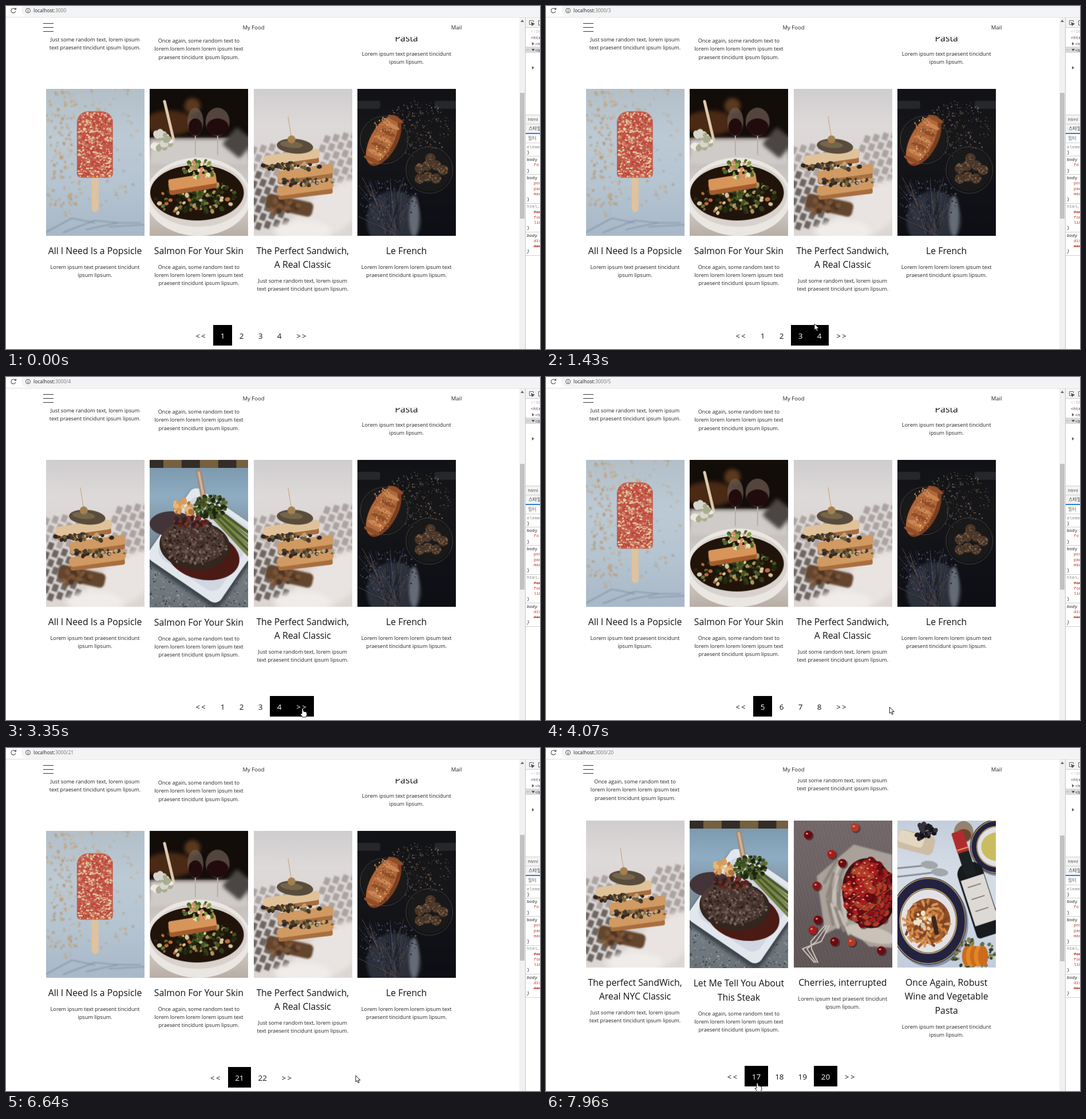
Recreate the animation shown at these times as an HTML page with a canvas. Size 933 by 600 pixels, loop 8 s.

```html
<!DOCTYPE html>
<html lang="en">
<head>
<meta charset="utf-8">
<title>My Food</title>
<style>
html, body { margin: 0; width: 100%; height: 100%; overflow: hidden; background: #fff; }
canvas { display: block; }
</style>
</head>
<body>
<canvas id="stage" width="933" height="600"></canvas>
<script>
const LOOP = 8000, LAST_PAGE = 22;
const SANS = '"Open Sans", "Noto Sans", sans-serif', MONO = '"Liberation Mono", monospace';
const KOREAN = '"Noto Sans CJK KR", "Noto Sans CJK", sans-serif';
const screen = document.getElementById('stage').getContext('2d');
let g = screen, seed = 1;

// Drawing helpers, all working on the current context g
const random = (from = 0, to = 1) => from + (to - from) * (seed = seed * 16807 % 2147483647) / 2147483647;
const pick = list => list[Math.floor(random(0, list.length))];
const repeat = (n, draw) => { for (let i = 0; i < n; i++) draw(i); };
const rect = (x, y, w, h, c) => { g.fillStyle = c; g.fillRect(x, y, w, h); };
const oval = (x, y, rx, ry = rx, c, rot = 0) => {
  g.fillStyle = c; g.beginPath(); g.ellipse(x, y, rx, ry, rot, 0, 7); g.fill();
};
const ring = (x, y, rx, ry, c, w = 1) => {
  g.strokeStyle = c; g.lineWidth = w; g.beginPath(); g.ellipse(x, y, rx, ry, 0, 0, 7); g.stroke();
};
const slab = (x, y, w, h, c, rot = 0, r = 4) => {
  g.save(); g.translate(x, y); g.rotate(rot);
  g.fillStyle = c; g.beginPath(); g.roundRect(-w / 2, -h / 2, w, h, r); g.fill();
  g.restore();
};
const trace = p => { g.beginPath(); for (let i = 0; i < p.length; i += 2) g.lineTo(p[i], p[i + 1]); };
const shape = (c, ...p) => { trace(p); g.fillStyle = c; g.fill(); };
const line = (c, w, ...p) => { trace(p); g.strokeStyle = c; g.lineWidth = w; g.stroke(); };
const wash = (...colors) => {
  const fill = g.createLinearGradient(0, 0, 0, 259);
  colors.forEach((c, i) => fill.addColorStop(i / (colors.length - 1), c));
  rect(0, 0, 172, 259, fill);
};
// Random specks inside an ellipse
const dots = (n, x, y, rx, ry, size, ...colors) => repeat(n, () => {
  const a = random(0, 6.283), d = Math.sqrt(random()), s = size * random(.5, 1.2);
  oval(x + Math.cos(a) * d * rx, y + Math.sin(a) * d * ry, s, s * .8, pick(colors), a);
});
// Evenly packed points inside an ellipse, from the rim inwards
const heap = (n, x, y, rx, ry, draw) => repeat(n, i => {
  const a = i * 2.4, d = Math.sqrt(1 - i / n);
  draw(x + Math.cos(a) * d * rx, y + Math.sin(a) * d * ry, a);
});
const soft = (px, draw) => { g.filter = `blur(${px}px)`; draw(); g.filter = 'none'; };
const text = (s, x, y, size, c = '#111', align = 'left', family = SANS, style = '') => {
  g.font = `${style} ${size}px ${family}`; g.fillStyle = c; g.textAlign = align;
  g.fillText(s, x, y);
};

// Simplified food pictures, each 172 by 259
const paint = {
  popsicle() {
    wash('#b3c0ca', '#bccad5', '#b5c4d1', '#a8b8c8');
    soft(1, () => {
      repeat(4, i => line('#8191a3', 1.6, i * 40 - 10, 258 - i * 5, i * 40 + 45, 228 + i * 4, i * 40 + 85, 236));
      dots(100, 30, 70, 32, 75, 2.4, '#c4a680', '#b79a79', '#d0b693');
      dots(110, 100, 90, 70, 120, 2.2, '#c4a680', '#d0b693', '#b0a294');
      dots(50, 32, 180, 30, 45, 2.4, '#c4a680', '#b79a79');
    });
    slab(86, 180, 12, 74, '#dfc39e', 0, 6);
    slab(85.5, 98, 63, 117, '#c4594a', 0, [20, 20, 7, 7]);
    g.save(); g.clip();
    g.beginPath(); g.roundRect(54, 40, 63, 117, [20, 20, 7, 7]); g.clip();
    g.restore();
    repeat(560, () => {
      const y = random(42, 155), inset = Math.max(0, 52 - y);
      oval(random(56 + inset, 115 - inset), y, random(1.2, 2.6), 1.6, pick(['#dcb98f', '#e6cfac', '#c23e38', '#cf8a6c', '#b5483a']));
    });
  },
  salmon() {
    wash('#0e0a08', '#1d120c', '#c4bfbc', '#d8d3cf', '#b8aea5');
    rect(0, 0, 172, 86, '#130d0a');
    soft(3, () => {
      oval(35, 60, 45, 22, '#4a2a14'); oval(75, 30, 14, 14, '#5b391d');
      rect(0, 88, 172, 45, '#cfcbc9'); slab(155, 95, 40, 40, '#4b4644', .7);
    });
    line('#dccab0', 5, 26, 22, 42, 90);
    dots(18, 20, 94, 18, 16, 7, '#efe9e2', '#d8d6cc', '#a9ae91');
    for (const [x, r] of [[80, 14], [119, 21]]) {
      line('#b9afa8', 2, x, 80, x, 116);
      oval(x, 58, r, 25, '#6b5a51bb'); oval(x, 67, r - 2, 15, '#220b0d');
    }
    oval(85, 190, 92, 69, '#eae6e2'); oval(85, 186, 86, 57, '#d9d2cc'); oval(83, 183, 82, 49, '#20130a');
    dots(90, 92, 190, 60, 28, 4.5, '#2f3d18', '#45551f', '#1e2911', '#a89a60');
    dots(40, 75, 198, 72, 24, 4, '#d4c69b', '#66763a', '#bb6c37', '#2c250f');
    slab(75, 170, 84, 22, '#a45b2c', -.16); slab(75, 163, 84, 20, '#d8955a', -.16);
    dots(60, 86, 141, 30, 15, 4, '#e8e1bd', '#879b4b', '#4f682a', '#da8d64');
  },
  sandwich() {
    wash('#d0cdce', '#dedada', '#dcd6d4', '#d8d2ce', '#ddd8d5');
    soft(1, () => repeat(120, i => {
      const x = i % 12 * 16 + Math.floor(i / 12) % 2 * 8, y = 108 + Math.floor(i / 12) * 15 - x * .15;
      if (x < 60 || x > 115) slab(x, y, 10, 13, x < 60 && y > 150 ? '#6d6664' : '#aaa3a2', .35, 1);
    }));
    soft(5, () => { oval(135, 215, 85, 38, '#e9e4e1', -.6); oval(85, 250, 50, 18, '#f0ecea'); });
    soft(1.5, () => { slab(62, 205, 84, 26, '#64462f', .22, 8); dots(25, 50, 208, 30, 12, 5, '#7d5637', '#4d3424'); });
    repeat(3, i => {
      const x = 78 + (i < 2) * 12 - (i > 1) * 12, y = 174 - i * 27;
      slab(x, y + 7, 96, 18, '#a86e3e', -.12); slab(x, y, 100, 17, i < 2 ? '#d09a62' : '#e0c29a', -.14, 7);
      if (i) dots(45, x, y + 17, 52, 6, 4, '#46392b', '#71643a', '#2f2721', '#c5a178');
    });
    oval(72, 101, 32, 13, '#5a4c3c', .08); oval(66, 98, 20, 6, '#75654a', .1);
    line('#c9a67c', 1.2, 60, 49, 66, 87); oval(66, 89, 7, 7, '#a4804f');
  },
  french() {
    wash('#111216', '#17171a', '#111217', '#0d0f14');
    for (const x of [15, 160]) slab(x, 28, 50, 14, '#26272b');
    dots(260, 105, 70, 58, 50, 1, '#8a755c', '#615143', '#a98e6d');
    for (const [x, y, r] of [[47, 90, 42], [126, 143, 41]]) { ring(x, y, r, r, '#45413e'); oval(x, y, r - 3, r - 3, '#1a191a'); }
    oval(46, 91, 49, 24, '#7c3f20', -1.08); oval(43, 90, 46, 20, '#b0683a', -1.08);
    repeat(7, i => oval(25 + i * 7, 125 - i * 12, 15, 4, i % 2 ? '#c98553' : '#8f4e2a', .45));
    dots(120, 44, 88, 20, 38, 1.3, '#e0b07c', '#8b4d29', '#c27a45');
    heap(8, 126, 143, 24, 24, (x, y) => { oval(x, y, 9, 9, '#4d3a2c'); dots(22, x, y, 8, 8, 1.4, '#8b6d50', '#3d2c22'); });
    soft(2, () => { oval(64, 232, 48, 52, '#2b303a'); oval(99, 224, 9, 36, '#666c77'); });
    repeat(80, () => line(pick(['#423d43', '#2a3042', '#171b24', '#5a4f48']), .9, random(0, 95), random(155, 225), random(50, 75), 258));
    dots(120, 55, 198, 50, 42, 1.6, '#444f7c', '#353b60', '#5d5068', '#1c2030');
  },
  steak() {
    wash('#7895aa', '#8fadc2', '#7c909c', '#767e85', '#6b7379');
    repeat(6, i => rect(i * 32 - 8, 0, 32, 14, i % 2 ? '#75603f' : '#342d27'));
    dots(600, 86, 215, 120, 70, 1.4, '#465058', '#a2aaae', '#8a959b', '#30373d');
    soft(3, () => slab(98, 157, 156, 156, '#3d434a', .6, 14));
    slab(98, 150, 152, 152, '#e2e7ee', .6, 14); slab(98, 147, 130, 130, '#d0d7e2', .6, 20);
    oval(94, 168, 64, 42, '#4c1a14', .2); oval(38, 112, 38, 22, '#43343a');
    dots(24, 60, 84, 17, 14, 6, '#d99b59', '#b3733c', '#e7b877');
    line('#a78a72', 10, 86, 22, 97, 78); line('#cdb49e', 4, 86, 22, 96, 72);
    repeat(6, i => line(i % 2 ? '#7a8548' : '#4b5a2a', 5, 112, 82 + i * 4, 174, 128 + i * 8));
    dots(120, 106, 82, 28, 22, 4, '#263517', '#425424', '#5d6d35', '#1c2412');
    oval(79, 150, 62, 43, '#33261f', .1); oval(76, 144, 56, 37, '#503c36', .1);
    dots(320, 78, 148, 57, 38, 2.6, '#6d5850', '#372923', '#7d6962', '#46332c', '#2b1f1b');
    dots(50, 74, 108, 36, 9, 4, '#5c211b', '#35201c', '#793428');
  },
  cherries() {
    wash('#74686b', '#6f6466', '#655a5c', '#615658');
    repeat(85, i => line(i % 2 ? '#ffffff08' : '#00000010', 1, i * 3 - 70, 0, i * 3, 259));
    const cherry = (x, y) => {
      oval(x + 2, y + 2, 8, 8, '#2a101580'); oval(x, y, 7.5, 7.5, pick(['#8d1116', '#a61d1b', '#6d0a0f', '#b53a26']));
      oval(x - 2, y - 2, 2, 1.4, '#dba095');
    };
    soft(1, () => {
      shape('#aaa29a', 40, 98, 105, 42, 172, 60, 172, 224, 132, 222, 90, 182, 55, 200);
      repeat(16, i => slab(64 + i % 4 * 8, 90 + i * 6, 5, 48, i % 2 ? '#c8c0b6' : '#8b837c', .5 - i * .06));
      oval(135, 200, 45, 14, '#cac2b9', .25);
    });
    repeat(3, i => line('#cdc5ba', 2, 62 - i * 4, 185, 48 - i * 9, 213, 15 + i * 8, 226, 36 + i * 3, 250));
    oval(131, 128, 46, 62, '#3a1215', -.15);
    heap(75, 131, 128, 42, 58, cherry);
    repeat(16, () => { const x = random(95, 160), y = random(80, 180); line('#9b7e46', 1, x, y, x + 15, y - 11); });
    for (const [x, y] of [[25, 25], [107, 12], [66, 59], [85, 75], [40, 115], [42, 175], [33, 193], [71, 213], [101, 214], [153, 229]]) {
      line('#81613f', 1, x, y, x - 13, y - 8); cherry(x, y);
    }
  },
  pasta() {
    wash('#c3cedc', '#d5dce6', '#d2dae5', '#c2cddd');
    slab(32, 38, 66, 34, '#cdbda5', .25, 9); slab(24, 32, 46, 22, '#e3d7c1', .3, 6);
    dots(30, 48, 20, 20, 13, 5, '#211d25', '#37303a', '#15131a');
    oval(116, 20, 17, 19, '#94816f'); oval(116, 26, 13, 11, '#6b4431');
    const plate = (x, y, rx, ry, food) => {
      oval(x + 3, y + 4, rx, ry, '#8792a4'); oval(x, y, rx, ry, '#232241');
      ring(x, y, rx - 2, ry - 2, '#b89d5d', 1.5); ring(x, y, rx * .74, ry * .74, '#bfa466', 2);
      oval(x, y, rx * .72, ry * .72, '#e2e2e6'); oval(x, y, rx * .58, ry * .52, food);
    };
    plate(174, 46, 47, 48, '#cabc60');
    repeat(2, i => { line('#8b8e94', 3, 0, 84 + i * 15, 60, 78 + i * 14); oval(56 + i * 18, 78 + i * 13, 15, 7, '#a3a7ac', .1); });
    plate(54, 177, 67, 77, '#8d4f29');
    heap(85, 50, 182, 38, 40, (x, y, a) =>
      slab(x, y, 13, 4.5, pick(['#cd8141', '#ad602d', '#d99758', '#7f4426']), a * 3, 2));
    dots(16, 45, 177, 14, 18, 4.5, '#eee3c9', '#dac8a8');
    slab(66, 185, 8, 34, '#3f261f', -.2);
    g.save(); g.translate(93, 24); g.rotate(-.31);
    slab(12, 124, 46, 134, '#171b1e', 0, [20, 20, 6, 6]); slab(12, 55, 20, 50, '#1b2123');
    slab(12, 18, 21, 38, '#b02c2c', 0, 3); rect(2, 30, 20, 2, '#dab37a');
    rect(-8, 84, 42, 84, '#dddad5');
    repeat(3, i => rect(0, 98 + i * 22, 24, 2, '#8c8379'));
    g.restore();
    dots(70, 132, 236, 42, 26, 4, '#4c5635', '#2d3b2b', '#8a8250', '#647047');
    repeat(5, i => oval(122 + i * 7, 239, 9, 18, i % 2 ? '#e28728' : '#cb6b1e'));
  }
};

const pictures = {};
for (const name in paint) {
  const canvas = document.createElement('canvas');
  canvas.width = 172; canvas.height = 259;
  g = canvas.getContext('2d'); g.lineCap = g.lineJoin = 'round'; seed = 4711;
  paint[name]();
  pictures[name] = canvas;
}
g = screen;

const JUST = ['Just some random text, lorem ipsum', 'text praesent tincidunt ipsum lipsum.'];
const ONCE = ['Once again, some random text to', 'lorem lorem lorem lorem ipsum text', 'praesent tincidunt ipsum lipsum.'];
const LOREM = ['Lorem ipsum text praesent tincidunt', 'ipsum lipsum.'];
const LONG = ['Lorem lorem lorem lorem ipsum text', 'praesent tincidunt ipsum lipsum.'];
const odd = {
  top: 145, pager: 558, thumb: 152,
  above: [[0, 59, JUST], [1, 61, ONCE], [3, 84, LOREM]],
  cards: [
    ['popsicle', ['All I Need Is a Popsicle'], LOREM],
    ['salmon', ['Salmon For Your Skin'], ONCE],
    ['sandwich', ['The Perfect Sandwich,', 'A Real Classic'], JUST],
    ['french', ['Le French'], LONG]]
};
const even = {
  top: 127, pager: 556, thumb: 153,
  above: [[0, 59, ONCE], [2, 57, JUST]],
  cards: [
    ['sandwich', ['The perfect SandWich,', 'Areal NYC Classic'], JUST],
    ['steak', ['Let Me Tell You About', 'This Steak'], ONCE],
    ['cherries', ['Cherries, interrupted'], LOREM],
    ['pasta', ['Once Again, Robust', 'Wine and Vegetable', 'Pasta'], LOREM]]
};
const layoutOf = page => page % 2 ? odd : even;

// Each visit: click time, time the captions change, page.
// The address follows one step later, the pager and first two pictures two steps later.
const STEP = 70;
const visits = [
  [-1, 0, 1], [500, 600, 2], [1000, 1100, 3], [1860, 1960, 4], [2520, 3300, 5],
  [4560, 4660, 9], [4860, 4960, 13], [5260, 5360, 17], [6310, 6380, 21], [7000, 7130, 22], [7560, 7820, 20]];
const pageAt = t => visits.filter(v => v[1] <= Math.max(t, 0)).pop()[2];

// Pointer moves: start time, then the spot reached after one glide
const GLIDE = 300;
const moves = [
  [170, 411, 582], [670, 444, 578], [1130, 469, 556], [1460, 477, 577], [2250, 528, 576], [2950, 518, 580],
  [3840, 613, 577], [4340, 534, 579], [5420, 632, 577], [5740, 524, 578], [6340, 611, 573],
  [6640, 450, 577], [7330, 369, 586]];

function pointerAt(t) {
  const i = moves.findLastIndex(m => m[0] <= t);
  if (i < 0) return [-99, -99];
  const [start, x, y] = moves[i], [, x0, y0] = i ? moves[i - 1] : [0, 420, 606];
  const k = Math.min(1, (t - start) / GLIDE), e = k * k * (3 - 2 * k);
  return [x0 + (x - x0) * e, y0 + (y - y0) * e];
}

const center = i => 155.5 + i * 181.4;
const heading = (s, i, y) => text(s, center(i), y + 5.8, 15.8, '#111', 'center');
const caption = (lines, i, y) => lines.forEach((s, n) => text(s, center(i), y + 3.2 + n * 14.2, 9.2, '#222', 'center'));

function drawContent({top, above, cards}, previous) {
  above.forEach(([i, y, lines]) => caption(lines, i, y));
  if (top === odd.top) heading('Pasta', 3, 56);
  cards.forEach(([picture, title, lines], i) => {
    const name = i < 2 ? previous.cards[i][0] : picture;
    const height = name === 'steak' ? 258.3 : 257;
    g.drawImage(pictures[name], Math.round(center(i) - 85.7), top, 171.5, height);
    const y = top + height + 26;
    title.forEach((s, n) => heading(s, i, y + n * 24.5));
    caption(lines, i, y + (title.length - 1) * 24.5 + 28.5);
  });
}

// Returns whether the pointer is on a button
function drawPager(active, y, [px, py]) {
  const first = active - (active - 1) % 4, labels = ['<\u2009<'];
  for (let n = first; n < first + 4 && n <= LAST_PAGE; n++) labels.push(String(n));
  labels.push('>\u2009>');
  const width = s => s.length > 2 ? 44 : s.length > 1 ? 40.3 : 33;
  let x = 428 - labels.reduce((sum, s) => sum + width(s), 0) / 2, onButton = false;
  for (const s of labels) {
    const w = width(s), hover = px >= x && px < x + w && py >= y - 2 && py < y + 36;
    const dark = hover || s === String(active);
    if (dark) rect(Math.round(x), y, Math.round(x + w) - Math.round(x), 36, '#000');
    text(s, x + w / 2, y + 23.8, s.length > 2 ? 12.8 : 13.5, dark ? '#fff' : '#111', 'center');
    onButton ||= hover && py >= y;
    x += w;
  }
  return onButton;
}

function drawHeader(page) {
  rect(0, 0, 933, 54, '#fff');
  slab(495, 7, 936, 22, '#f1f3f4', 0, 10); rect(0, 19, 933, 1, '#dcdcdc');
  g.strokeStyle = '#555'; g.lineWidth = 1.2; g.beginPath(); g.arc(13, 8, 4, .3, 5.4); g.stroke();
  shape('#555', 14, 6.5, 18, 6.5, 18, 2.5);
  ring(38.5, 8, 4, 4, '#555'); rect(38, 7, 1, 4, '#555'); rect(38, 5, 1, 1, '#555');
  text('localhost:', 48, 11.2, 8.5, '#222');
  text('3000' + (page > 1 ? '/' + page : ''), 48 + g.measureText('localhost:').width, 11.2, 8.5, '#777');
  repeat(3, i => rect(65, 30 + i * 7, 18, 1, '#333'));
  text('My Food', 432.5, 41, 9.5, '#222', 'center');
  text('Mail', 787, 41, 9.5, '#222', 'center');
}

const tags = ['<!DO', '<htm', ' <h', ' <b'];
const rules = ['eleme }', 'body{ fo }', 'body{ pos pad mar }', 'html, -fon fon lin }', 'body{ dis -mar }'];

function drawSide(thumb) {
  rect(897, 20, 10, 580, '#f1f1f1'); rect(898, thumb, 8, 220, '#c1c1c1');
  shape('#666', 899, 28, 905, 28, 902, 24);
  rect(907, 20, 26, 580, '#fff'); rect(907, 20, 1, 580, '#c5c5c5');
  rect(908, 20, 25, 17, '#f3f3f3'); rect(908, 190, 25, 33, '#f3f3f3'); rect(908, 71, 25, 11, '#dadada');
  for (const y of [37, 190, 206, 239]) rect(908, y, 25, 1, '#d0d0d0');
  rect(908, 222, 25, 2, '#2b7de0');
  line('#666', 1, 920, 32.5, 914.5, 32.5, 914.5, 25.5, 921.5, 25.5, 921.5, 28);
  shape('#555', 917, 28, 924, 31, 919, 35);
  line('#666', 1, 933, 25.5, 930.5, 25.5, 930.5, 33.5, 933, 33.5);
  for (const y of [66, 108]) shape('#666', 919, y - 3, 923, y, 919, y + 3);
  shape('#555', 918, 75, 924, 75, 921, 79);
  text('···', 909, 79, 7, '#666');
  tags.forEach((s, i) => text(s, 917 + (i > 1) * 3, 46.5 + i * 11, 7.6, i ? '#5d3a5a' : '#bbb', 'left', MONO));
  let y = 246;
  rules.forEach((rule, r) => {
    rule.split(' ').forEach((word, i) => {
      const inner = i > 0 && word !== '}', name = word.replace('-', '').replace('{', ' {');
      const tone = inner ? '#c03a2a' : r % 3 || i ? '#222' : '#888';
      text(name, inner ? 922 : 910, y + 2.5, 7.6, tone, 'left', MONO, r === 4 ? 'italic' : '');
      if (word[0] === '-') rect(922, Math.round(y), 11, 1, tone);
      y += 9.2;
    });
    rect(908, Math.round(y - 2), 25, 1, '#d0d0d0');
    y += 4.3;
  });
  text('html', 912, 201, 8, '#444');
  text('스타일', 913, 217, 8, '#333', 'left', KOREAN);
  text('필터', 912, 234, 8, '#666', 'left', KOREAN);
}

function drawPointer([x, y], hand, clicked) {
  if (clicked) oval(x, y, 7.5, 7.5, 'rgba(255,255,0,.55)');
  const outline = hand
    ? [-1, 0, 1, 0, 2, 5, 7, 6, 8, 11, 6, 15, 0, 15, -4, 9, -1, 9]
    : [0, 0, 0, 11, 2.5, 8.7, 4.5, 13, 6.2, 12, 4.3, 8, 8, 8];
  g.save(); g.translate(x, y);
  shape('#fff', ...outline); g.closePath();
  g.strokeStyle = '#000'; g.lineWidth = .9; g.stroke();
  g.restore();
}

function frame(now) {
  const t = now % LOOP, pointer = pointerAt(t);
  const layout = layoutOf(pageAt(t)), settled = pageAt(t - 2 * STEP);
  rect(0, 0, 933, 600, '#fff');
  drawContent(layout, layoutOf(settled));
  const hand = drawPager(settled, layout.pager, pointer);
  drawHeader(pageAt(t - STEP));
  drawSide(layout.thumb);
  drawPointer(pointer, hand, visits.some(([click]) => click > 0 && t >= click && t < click + STEP));
  requestAnimationFrame(frame);
}
requestAnimationFrame(frame);
</script>
</body>
</html>
```
